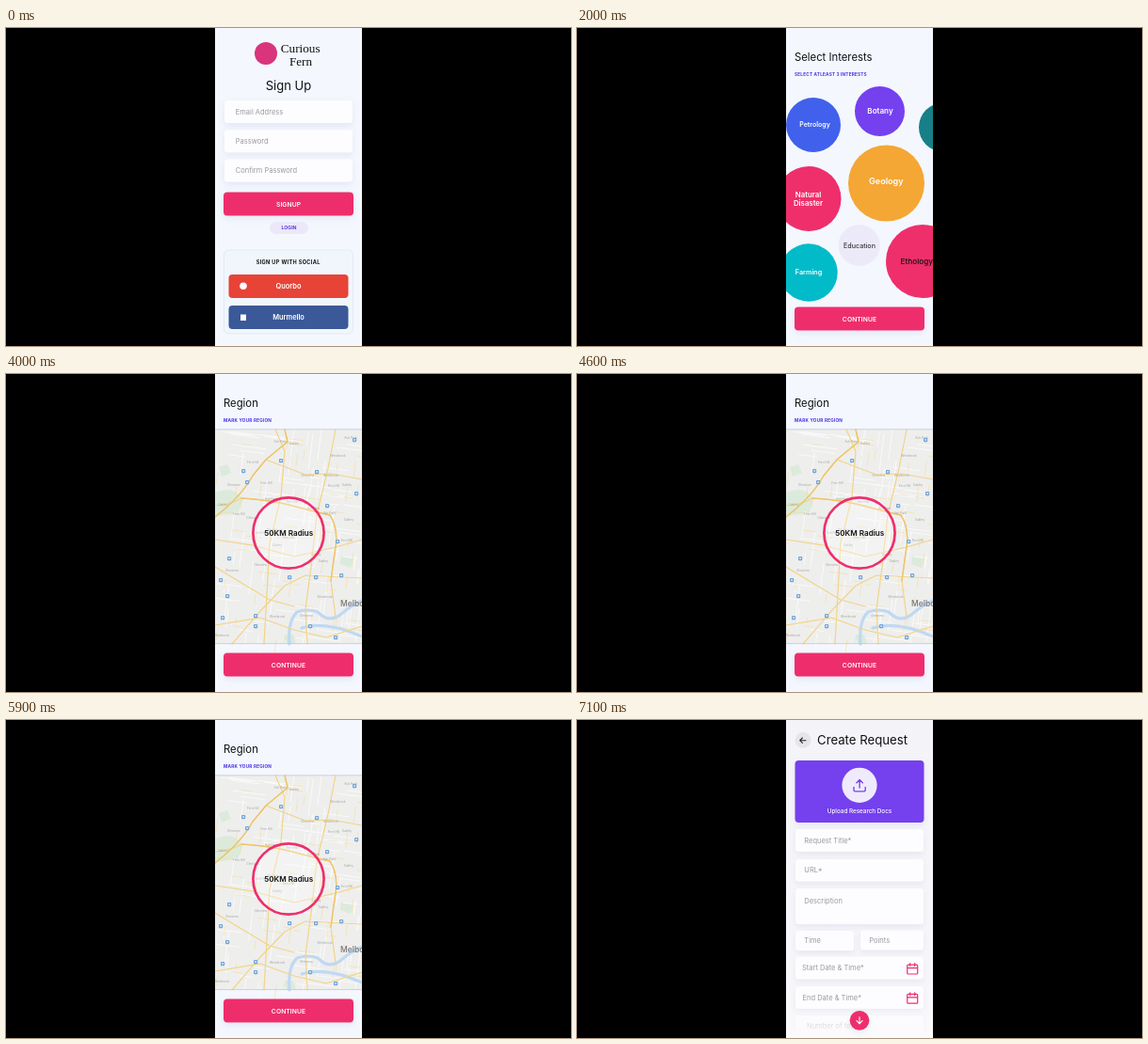
Write an HTML page that moves like this. It is 600 px wide and 338 px high and loops after 8 s.

```html
<!DOCTYPE html>
<html lang="en">
<head>
<meta charset="utf-8">
<title>App walkthrough</title>
<style>
html, body { margin: 0; width: 100%; height: 100%; overflow: hidden; background: #000; }
svg { display: block; width: 100vw; height: 100vh; }
text { font-family: Inter, "Open Sans", sans-serif; }
.serif { font-family: "Liberation Serif", serif; }
</style>
</head>
<body>
<svg id="stage" viewBox="0 0 600 338"></svg>
<script>
const PINK = '#ee2f6c', PURPLE = '#7540ee', INDIGO = '#4a32e0', HINT = '#9a9a9f';
const DURATION = 8000, SCENE_TIME = 2000;

const attrs = o => Object.entries(o).map(([k, v]) => ` ${k}="${v}"`).join('');
const rect = (x, y, w, h, fill, r = 0, extra = {}) =>
  `<rect${attrs({ x, y, width: w, height: h, rx: r, fill, ...extra })}/>`;
const circle = (cx, cy, r, fill, extra = {}) => `<circle${attrs({ cx, cy, r, fill, ...extra })}/>`;
const path = (d, stroke, width, extra = {}) =>
  `<path${attrs({ d, fill: 'none', stroke, 'stroke-width': width, 'stroke-linecap': 'round', 'stroke-linejoin': 'round', ...extra })}/>`;
const text = (s, x, y, size, fill, weight = 400, extra = {}) =>
  `<text${attrs({ x, y, 'font-size': size, fill, 'font-weight': weight, ...extra })}>${s}</text>`;
const centered = (s, x, y, size, fill, weight, extra = {}) =>
  text(s, x, y, size, fill, weight, { 'text-anchor': 'middle', ...extra });

const soft = { filter: 'url(#soft)' };
const panel = fill => rect(222, 0, 156, 338, fill);
const field = (label, x, y, w, h, tx, ty) =>
  rect(x, y, w, h, '#fdfdff', 3.5, soft) + text(label, tx, ty, 7.5, HINT);
const button = (label, y) =>
  rect(231, y, 138, 25, PINK, 4, soft) + centered(label, 300, y + 15, 6.7, '#fff', 600, { 'letter-spacing': .1 });
const heading = (title, note) =>
  text(title, 231, 35.3, 11.3, '#111') + text(note, 231, 50.6, 4.7, INDIGO, 700, { 'letter-spacing': .2 });

function signUp() {
  const social = (name, y, fill, mark) =>
    rect(236.5, y, 127, 25, fill, 4) + mark + centered(name, 300, y + 15.1, 7.4, '#fff', 600);
  return panel('#f4f7fe') +
    circle(276, 27, 12, '#d9347c') +
    centered('Curious', 312.7, 25.7, 13.2, '#111', 400, { class: 'serif' }) +
    centered('Fern', 313, 39.7, 13.2, '#111', 400, { class: 'serif' }) +
    centered('Sign Up', 300, 66, 13, '#111') +
    ['Email Address', 'Password', 'Confirm Password']
      .map((s, i) => field(s, 232, 77 + i * 31.2, 136, 24, 243.8, 91.6 + i * 31.2)).join('') +
    button('SIGNUP', 174.5) +
    rect(280, 206, 41, 13, '#ece8fa', 6.5) +
    centered('LOGIN', 300.5, 214.4, 5.2, '#6238e2', 700) +
    rect(231.5, 236, 137, 89, '#f1f6fd', 5, { stroke: '#dde6f2', 'stroke-width': .8 }) +
    centered('SIGN UP WITH SOCIAL', 299.7, 250.5, 5.6, '#111', 700, { 'letter-spacing': .33 }) +
    social('Quorbo', 262, '#e74337', circle(252, 274.3, 3.8, '#fff')) +
    social('Murmello', 295, '#3b5998', rect(249, 304.5, 6, 6.5, '#fff'));
}

function interests() {
  const bubble = (cx, cy, r, fill, label = '', tx = cx, ty = cy + 3, size = 7, color = '#fff') =>
    circle(cx, cy, r, fill) + centered(label, tx, ty, size, color, color === '#fff' ? 600 : 500);
  return panel('#f4f7fe') + heading('Select Interests', 'SELECT ATLEAST 3 INTERESTS') +
    bubble(251, 103, 29, '#4161ec', 'Petrology', 252.5, 105.4) +
    bubble(321.5, 88.5, 26.5, PURPLE, 'Botany', 322, 91.3, 8.1) +
    bubble(389, 105.5, 26, '#177f88') +
    bubble(246, 181.5, 34.5, PINK, 'Natural', 245.5, 179.8, 7.8) +
    centered('Disaster', 245.5, 189, 7.8, '#fff', 600) +
    bubble(328.5, 165, 40.5, '#f4a735', 'Geology', 328.3, 166.2, 9.1) +
    bubble(246, 260, 30.7, '#02bbc9', 'Farming', 246, 262.3, 7.2) +
    bubble(299.7, 231, 22, '#eceaf9', 'Education', 300, 233.5, 7.1, '#333') +
    bubble(367, 248, 39, PINK, 'Ethology', 360.8, 250.8, 8.2, '#111') +
    button('CONTINUE', 296.5);
}

function seeded(seed) {
  return () => (seed = (seed * 16807) % 2147483647) / 2147483647;
}

function cityMap() {
  const rnd = seeded(77);
  const at = (lo, hi) => (lo + rnd() * (hi - lo)).toFixed(1);
  let streets = '', lanes = '', labels = '';
  for (let i = 0; i < 110; i++) {
    const x = at(218, 378), y = at(59, 287), len = +at(10, 40);
    streets += i % 2 ? `M${x} ${y}l${len} ${len * .13}` : `M${x} ${y}l${-len * .13} ${len}`;
  }
  for (let i = 0; i < 62; i++) {
    const x = at(222, 375), y = at(62, 284), len = +at(5, 20);
    lanes += i % 2 ? `M${x} ${y}l${len} ${len * .13}` : `M${x} ${y}l${-len * .13} ${len}`;
  }
  const suburbs = ['Oakley', 'Fern Hill', 'Westbrook', 'Ash Park', 'Glenview'];
  for (let i = 0; i < 32; i++)
    labels += centered(suburbs[i % 5], at(228, 372), at(66, 284), 3.2, '#a5a5a5');
  const main = 'M222 152Q250 130 262 108L276 91L299 72L296 59M276 91L318 107L345 106L378 112' +
    'M222 140Q238 139 250 132Q282 134 304 140T344 150Q354 165 349 190L345 220L350 258' +
    'M222 205L250 222L280 240L306 247M240 287L270 252L296 225L318 214L378 217' +
    'M286 59L296 82L292 130L280 180L274 287M320 287L318 250L324 205L330 150L342 100L350 59' +
    'M222 176L262 182L306 194L350 184L378 176M222 267L270 259L306 272L340 280L378 268';
  const river = 'M301 287Q299 262 309 253Q321 249 331 253Q343 265 355 256Q366 246 378 241M314 270Q339 262 378 279';
  const shields = [[370, 70], [292, 92], [256, 115], [252, 103], [330, 104], [372, 127], [341, 140],
    [352, 178], [237, 196], [228, 219], [235, 236], [301, 216], [329, 216], [356, 214],
    [230, 259], [265, 257], [265, 268], [323, 268], [350, 280]];
  return rect(222, 59, 156, 228, '#eeeeed') +
    `<path d="M222 126Q235 121 243 125L252 132L246 148L222 151Z M226 99l9 -3 4 9 -10 4Z M296 277h9l3 10h-13Z M356 193l12 3 -2 10 -11 -4Z" fill="#dceadb"/>` +
    path(streets, '#fafafa', 1) + path(lanes, '#f3dfa2', .65) +
    path(river, '#bfd9f3', 3.2) + path(main, '#f2d486', 1.2) +
    path('M222 152Q250 130 262 108L276 91L299 72L296 59M250 132Q282 134 304 140T344 150Q354 165 349 190L345 220', '#eec469', 1.4) +
    labels +
    shields.map(([x, y]) => rect(x - 2, y - 2, 4.2, 4.2, '#71a4d8', 1) + rect(x - .9, y - .7, 2, 1.4, '#e8f2fb')).join('') +
    text('Melbourne', 355, 247, 8.5, '#777', 500);
}

function region() {
  return panel('#f4f7fe') + heading('Region', 'MARK YOUR REGION') + cityMap() +
    path('M222 58.8H378M222 286.6H378', '#c5c6d3', .8) +
    circle(300, 169, 37.6, '#ffffff', { 'fill-opacity': .3, stroke: PINK, 'stroke-width': 2.7 }) +
    centered('50KM Radius', 300.3, 171.8, 8.1, '#111', 600) +
    button('CONTINUE', 296.5);
}

function createRequest() {
  const calendar = y => path(`M351.7 ${y - 4.2}h9a1 1 0 0 1 1 1v7.8a1 1 0 0 1 -1 1h-9a1 1 0 0 1 -1 -1v-7.8a1 1 0 0 1 1 -1z` +
    `M350.7 ${y - .8}h11M353.7 ${y - 5.8}v3M358.7 ${y - 5.8}v3`, PINK, 1.2);
  return panel('url(#paper)') +
    circle(240, 21.5, 8.5, '#e6e6ea') +
    path('M243 21.7h-6.2m2.6 -2.7l-2.7 2.7l2.7 2.7', '#222', 1.1) +
    text('Create Request', 255, 25.6, 13.2, '#111') +
    rect(231.5, 43, 137, 66, PURPLE, 4, soft) +
    circle(300, 69.3, 18.6, '#efebfd') +
    path('M294 71.5v3a1.4 1.4 0 0 0 1.4 1.4h9.4a1.4 1.4 0 0 0 1.4 -1.4v-3M300.1 72v-8.4m-3.2 3.2l3.2 -3.2l3.2 3.2', PURPLE, 1.35) +
    centered('Upload Research Docs', 300, 99, 6.3, '#fff', 500) +
    field('Request Title*', 232, 116, 136, 24, 241.3, 131) +
    field('URL*', 232, 148, 136, 23.5, 241.3, 162.3) +
    field('Description', 232, 179, 136, 38, 241.3, 195.2) +
    field('Time', 232, 224, 62, 21, 241.3, 237.4) +
    field('Points', 301, 223.5, 67, 21, 310.3, 237) +
    field('Start Date &amp; Time*', 232, 251.5, 136, 24, 239, 266.3) +
    field('End Date &amp; Time*', 232, 283, 136, 24, 239.5, 297.6) +
    field('Number of tests', 232, 314, 136, 24, 244, 328.3) +
    calendar(264.4) + calendar(295.6) +
    rect(222, 306, 156, 32, 'url(#fade)') +
    circle(300, 319.3, 10.4, PINK, soft) +
    path('M300 315.8v7m-3.1 -3.1l3.1 3.1l3.1 -3.1', '#fff', 1.1);
}

const defs = `<defs>
  <clipPath id="phone"><rect x="222" width="156" height="338"/></clipPath>
  <filter id="soft" x="-20%" y="-40%" width="140%" height="200%">
    <feDropShadow dx="0" dy="3" stdDeviation="3.5" flood-color="#8b93b8" flood-opacity=".16"/>
  </filter>
  <linearGradient id="paper" x2="0" y2="1"><stop stop-color="#f4f4f8"/><stop offset="1" stop-color="#f8f8fb"/></linearGradient>
  <linearGradient id="fade" x2="0" y2="1"><stop stop-color="#fafafc" stop-opacity=".2"/>
    <stop offset=".7" stop-color="#fafafc" stop-opacity=".8"/><stop offset="1" stop-color="#fbfbfd"/></linearGradient>
</defs>`;

const stage = document.getElementById('stage');
stage.innerHTML = defs + rect(0, 0, 600, 338, '#000') +
  [signUp, interests, region, createRequest]
    .map(scene => `<g class="scene" clip-path="url(#phone)">${scene()}</g>`).join('');
const scenes = stage.querySelectorAll('.scene');

function draw(now) {
  const current = Math.floor((now % DURATION) / SCENE_TIME);
  scenes.forEach((scene, i) => scene.setAttribute('display', i === current ? 'inline' : 'none'));
}

const start = performance.now();
function tick() {
  draw(performance.now() - start);
  requestAnimationFrame(tick);
}
tick();
</script>
</body>
</html>
```
